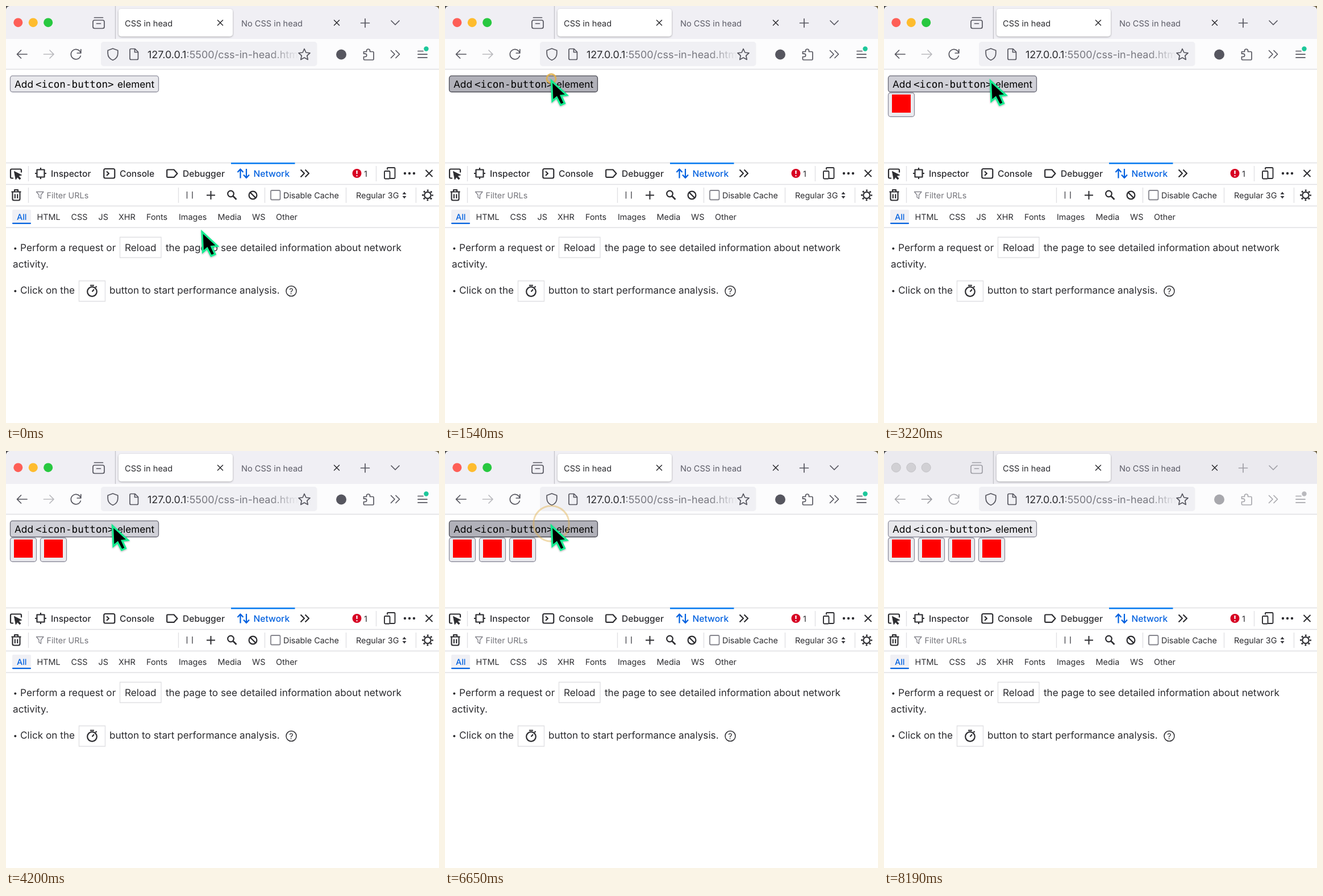
An HTML page that plays this animation: 762 px wide and 735 px high, repeating every 8.26 s.

```html
<!DOCTYPE html>
<html lang="en">
<head>
<meta charset="utf-8">
<title>CSS in head</title>
<style>
  html, body { margin: 0; width: 100%; height: 100%; overflow: hidden; background: #fff; }
  svg { display: block; width: 762px; height: 735px; font-family: Inter, sans-serif; }
  text { fill: #2b2b2f; stroke: none; white-space: pre; text-rendering: geometricPrecision; }
  .line { fill: none; stroke: #56565f; stroke-width: 1.7; stroke-linecap: round; stroke-linejoin: round; }
  .tool { fill: none; stroke: #2d2d31; stroke-width: 2.2; stroke-linejoin: round; }
  .rule { stroke: #dfdfe2; stroke-width: 1.3; fill: none; }
  .tab { font-size: 14.6px; }
  .panel { font-size: 15.6px; font-weight: 500; }
  .small { font-size: 14.4px; }
  .body { font-size: 17.2px; }
  .code { font: 17.6px "DejaVu Sans Mono", monospace; fill: #000; }
  .blue { fill: #0060df; }
</style>
</head>
<body>
<svg viewBox="0 0 762 735">
  <defs>
    <linearGradient id="fade" x1="0" x2="1">
      <stop offset="0" stop-color="#f0f0f4" stop-opacity="0"/>
      <stop offset=".85" stop-color="#f0f0f4"/>
    </linearGradient>
    <filter id="soft" x="-30%" y="-30%" width="160%" height="160%">
      <feDropShadow dx="0" dy="1" stdDeviation="1.8" flood-opacity=".35"/>
    </filter>
  </defs>

  <!-- Browser window -->
  <rect width="762" height="735" fill="#fff"/>
  <rect id="header" width="762" height="58"/>
  <rect y="58" width="762" height="53" fill="#fcfcfd"/>
  <path class="rule" d="M0 111.5H762"/>
  <path d="M192.5 0V58" stroke="#c3c3c9" stroke-width="1.3"/>
  <path d="M0 0H6Q1 1 0 6Z" fill="#4b4b4d"/>
  <path d="M762 0H754Q761 1 762 6Z" fill="#75684a"/>
  <g id="lights">
    <circle cx="21.3" cy="29.2" r="8"/>
    <circle cx="47.8" cy="29.2" r="8"/>
    <circle cx="74.2" cy="29.2" r="8"/>
  </g>
  <rect x="198" y="5" width="201" height="48.5" rx="5" fill="#fff" filter="url(#soft)"/>
  <text class="tab" x="209" y="36" fill="#15141a">CSS in head</text>
  <text class="tab" x="414" y="36" style="fill:#5b5b66">No CSS in head</text>
  <path class="line" d="M372.5 25l9 9m0-9l-9 9M577.5 25l9 9m0-9l-9 9" style="stroke:#2b2b2f;stroke-width:1.5"/>

  <g id="chrome">
    <g class="line">
      <path d="M155.5 20.500h15M156 25h14q3 0 3 3v8.500q0 3-3 3h-14q-3 0-3-3v-8.500q0-3 3-3zM159.500 31h7"/>
      <path d="M632 22.500v15m-7.500-7.500h15M678 26l7 7 7-7"/>
      <path d="M37 85H19.500m7-7l-7 7 7 7"/>
      <path d="M131.500 83a8.700 8.700 0 1 0-.2 5M131.800 76.500v6.500h-6.500"/>
      <path d="M677.500 78.500l6.500 6.500-6.500 6.500m8.500-13l6.500 6.500-6.500 6.500M725 79.500h9m-9 5.700h16m-16 5.700h16"/>
      <path d="M630 80.500h4.500v-1.500a3 3 0 0 1 6 0v1.500h5q1.500 0 1.500 1.500v11.500q0 1.500-1.500 1.500H631q-1.500 0-1.500-1.500v-4h2.500a2.700 2.700 0 0 0 0-5.400h-2.500v-3.600z"/>
    </g>
    <circle cx="590" cy="85.500" r="9" fill="#56565f"/>
  </g>
  <path id="forward" class="line" d="M66.500 85H84m-7-7l7 7-7 7"/>
  <circle id="badge" cx="739.500" cy="75.500" r="4.200"/>

  <rect x="167" y="63" width="380.500" height="43" rx="5" fill="#f0f0f4"/>
  <text x="249" y="92" font-size="18">127.0.0.1<tspan fill="#77777f">:5500/css-in-head.htm</tspan></text>
  <rect x="464" y="66" width="60" height="37" fill="url(#fade)"/>
  <g class="line">
    <path d="M188 75l8.800 3.200v5.300q0 8.500-8.800 12-8.800-3.500-8.800-12v-5.300z"/>
    <path d="M220 75.500h7l5.500 5.500v11.500q0 2-2 2h-10.500q-2 0-2-2v-15q0-2 2-2zm6.500.5v5.500h5.500"/>
    <path id="star"/>
  </g>

  <!-- Page -->
  <rect id="add" x="7.500" y="123.200" width="261" height="28.300" rx="4" stroke-width="1.300"/>
  <text class="body" x="15" y="143.500" style="fill:#000">Add</text>
  <text class="code" x="52" y="143.500">&lt;icon-button&gt;</text>
  <text class="body" x="196" y="143.500" style="fill:#000">element</text>
  <g id="icons"></g>

  <!-- Developer tools -->
  <path class="rule" d="M0 276.500H762M0 314.500H762M0 352.500H762M0 390.500H762M39.500 282v27M651.500 282v27M39.500 320v27M303.500 320v27M455.500 320v27M598.500 320v27M721.500 320v27"/>
  <rect x="396" y="276" width="112.500" height="2.600" fill="#0a7cf0"/>
  <g class="tool">
    <path d="M13 303.500h-3q-2-.2-2-2v-12q0-2 2-2h15q2 0 2 2v4"/>
    <path d="M14.500 291.500l13 6.500-5.500 1.500 4 4.500-2 1.800-4-4.300-2.700 4.500z" fill="#2d2d31" stroke-width="1"/>
    <path d="M54.500 288.500h13v13h-13zM61 285v3.500m0 13v3.500M51 295h3.500m13 0h3.500"/>
    <rect x="172.300" y="287" width="19" height="16.500" rx="2.500"/>
    <path d="M177 291.500l4 3.700-4 3.700"/>
    <path d="M284.500 288.500h11l6 6.700-6 6.700h-11q-1.300 0-1.300-1.300v-10.800q0-1.300 1.300-1.300z"/>
    <path d="M412.500 303.500v-16m-5 5.500l5-5.500 5 5.500M423 287v16m-5-5.500l5 5.500 5-5.500" stroke="#0060df"/>
    <path d="M518.500 288.500l6.500 6.500-6.500 6.500m8-13l6.500 6.500-6.500 6.500"/>
    <path d="M671 288.500v-2.500q0-1 1-1h11q1.500 0 1.500 1.500v16q0 1.500-1.500 1.500h-7" stroke-width="1.900"/>
    <rect x="666" y="291" width="9.500" height="13.500" rx="1.500" stroke-width="1.900"/>
    <path d="M738.500 289l12 12m0-12l-12 12" stroke-width="2"/>
    <path d="M9.500 327.500h17m-11.500-.5v-3h6v3M11.500 328v12q0 2.500 2.500 2.500h8q2.500 0 2.500-2.500v-12M15.800 331.500v7.500m4.400-7.500v7.500" stroke-width="2.100"/>
    <path d="M53.500 327.500h12.500l-4.500 5.500v6.500l-3.500-2.500v-4z" stroke="#85858d" stroke-width="1.400"/>
    <path d="M318.500 327v12.500m9.500-12.500v12.500" stroke="#55555b" stroke-width="1.500"/>
    <path d="M360.500 326v15m-7.500-7.500h15" stroke-width="2"/>
    <circle cx="395.500" cy="331" r="5.300"/><path d="M399.500 335l6 6" stroke-width="2.600"/>
    <circle cx="434.500" cy="333.500" r="6.900"/><path d="M429.700 328.600l9.700 9.700"/>
    <rect x="466" y="325" width="16.500" height="16.500" rx="2" stroke="#85858d" stroke-width="1.800"/>
    <circle cx="742" cy="333.500" r="5.700"/>
    <circle cx="742" cy="333.500" r="8.400" stroke-width="3" stroke-dasharray="2.700 3.897" stroke-dashoffset="1.350"/>
  </g>
  <path d="M697.500 332l3.500-4.500 3.500 4.500zm0 3l3.500 4.500 3.500-4.500z" fill="#3b3b40"/>
  <g fill="#2d2d31"><circle cx="702" cy="295" r="2.200"/><circle cx="710" cy="295" r="2.200"/><circle cx="718" cy="295" r="2.200"/></g>
  <circle cx="617.500" cy="295" r="8" fill="#d70022"/>
  <path d="M617.500 290v6m0 2.200v2" stroke="#fff" stroke-width="2.200"/>
  <text class="small" x="630" y="300.500">1</text>
  <g class="panel">
    <text x="79" y="301">Inspector</text>
    <text x="200" y="301">Console</text>
    <text x="311" y="301">Debugger</text>
    <text class="blue" x="435.500" y="301">Network</text>
  </g>
  <rect x="11" y="359" width="33" height="25" rx="2" fill="#f0f0f5"/>
  <rect x="11" y="382" width="33" height="2.300" rx="1" fill="#0060df"/>
  <g class="small">
    <text x="71.500" y="338.500" style="fill:#737379">Filter URLs</text>
    <text x="488" y="338.500">Disable Cache</text>
    <text x="616" y="338.500">Regular 3G</text>
    <text class="blue" x="19" y="377" font-weight="500">All</text>
    <text x="54.500" y="377">HTML</text>
    <text x="114.500" y="377">CSS</text>
    <text x="162.500" y="377">JS</text>
    <text x="198" y="377">XHR</text>
    <text x="247" y="377">Fonts</text>
    <text x="304" y="377">Images</text>
    <text x="372.500" y="377">Media</text>
    <text x="433" y="377">WS</text>
    <text x="475" y="377">Other</text>
  </g>
  <path class="rule" d="M200.500 407.500h72.500v36h-72.500zM128.500 484.500h46v36h-46z"/>
  <circle cx="16.300" cy="427.500" r="2" fill="#2b2b2f"/>
  <circle cx="16.300" cy="502.500" r="2" fill="#2b2b2f"/>
  <g class="body">
    <text x="25" y="432">Perform a request or</text>
    <text x="209" y="432">Reload</text>
    <text x="281" y="432">the page to see detailed information about network</text>
    <text x="12" y="461">activity.</text>
    <text x="25" y="507">Click on the</text>
    <text x="182" y="507">button to start performance analysis.</text>
  </g>
  <g class="tool">
    <circle cx="151.500" cy="503.500" r="8.300"/>
    <path d="M148 492.500h7m-3.500 11l3.500-4m2.500-3.500l2-2"/>
    <circle cx="502" cy="502.500" r="9" stroke-width="1.500"/>
  </g>
  <text class="small" x="502" y="507.500" text-anchor="middle">?</text>

  <!-- Pointer -->
  <circle id="ring" cx="187" cy="128" fill="none" stroke="#e0b04c" stroke-width="3"/>
  <path id="cursor" d="M2 4L3.500 39.500 11 33 18 46.500 25 43.500 18.800 30.200 29 29Z" fill="#000" stroke="#12ec90" stroke-width="3.200" filter="url(#soft)"/>
</svg>
<script>
const $ = id => document.getElementById(id);
const set = (id, attrs) => { for (const k in attrs) $(id).setAttribute(k, attrs[k]); };

const LOOP = 8260, STEP = 70, BLUR_AT = 8120;
const CLICKS = [1540, 3570, 4970, 6510];
const PRESS = 210, RING = 280;
// Pointer path: time, x, y
const PATH = [
  [0, 343, 394], [420, 343, 394], [910, 188.5, 120], [980, 188, 120],
  [1190, 185.5, 128], [6930, 185.5, 128], [7350, 300, 760], [LOOP, 300, 760]
];
const LIGHTS = ['#fe5f57', '#febc2e', '#28c840'];

$('icons').innerHTML = CLICKS.map((_, i) => `<g transform="translate(${i * 53})">
  <rect x="7.500" y="153" width="46" height="42" rx="4" fill="#ebebef" stroke="#8f8f9d" stroke-width="1.300"/>
  <rect x="14" y="156" width="33" height="32" fill="#f00"/></g>`).join('');

const star = Array.from({ length: 10 }, (_, i) => {
  const a = i * Math.PI / 5, r = i % 2 ? 5 : 10.5;
  return [525 + r * Math.sin(a), 86 - r * Math.cos(a)].map(v => v.toFixed(1));
});
set('star', { d: `M${star.join('L')}Z` });

function pointerAt(t) {
  const i = PATH.findIndex(p => p[0] > t);
  const [t0, x0, y0] = PATH[i - 1], [t1, x1, y1] = PATH[i];
  const p = (t - t0) / (t1 - t0), e = p * p * (3 - 2 * p);
  return [x0 + (x1 - x0) * e, y0 + (y1 - y0) * e];
}

function draw(t) {
  const blurred = t >= BLUR_AT;
  set('header', { fill: blurred ? '#ebeaef' : '#f0eff4' });
  [...$('lights').children].forEach((dot, i) => {
    dot.setAttribute('fill', blurred ? '#d1d0d4' : LIGHTS[i]);
    dot.setAttribute('stroke', blurred ? '#c3c2c6' : 'none');
  });
  set('chrome', { opacity: blurred ? .5 : 1 });
  set('forward', { opacity: blurred ? .6 : .4 });
  set('badge', { fill: blurred ? '#b9b9bd' : '#1cc79a' });

  const [x, y] = pointerAt(t);
  set('cursor', { transform: `translate(${x} ${y})` });

  const since = t - (CLICKS.findLast(c => c <= t) ?? -LOOP);
  const hover = y > 122 && y < 152, pressed = since < PRESS;
  set('add', {
    fill: pressed ? '#b1b1b9' : hover ? '#d0d0d7' : '#e9e9ed',
    stroke: pressed ? '#484851' : hover ? '#676774' : '#8f8f9d'
  });
  [...$('icons').children].forEach((icon, i) =>
    icon.setAttribute('visibility', t >= CLICKS[i] + PRESS ? 'visible' : 'hidden'));

  const p = Math.min(1, since / RING);
  set('ring', { r: 8 + 31 * (1 - (1 - p) ** 2), opacity: .9 * (1 - p) });
}

function tick() {
  const t = performance.now() % LOOP;
  draw(Math.floor(t / STEP) * STEP);
  requestAnimationFrame(tick);
}
tick();
</script>
</body>
</html>
```
